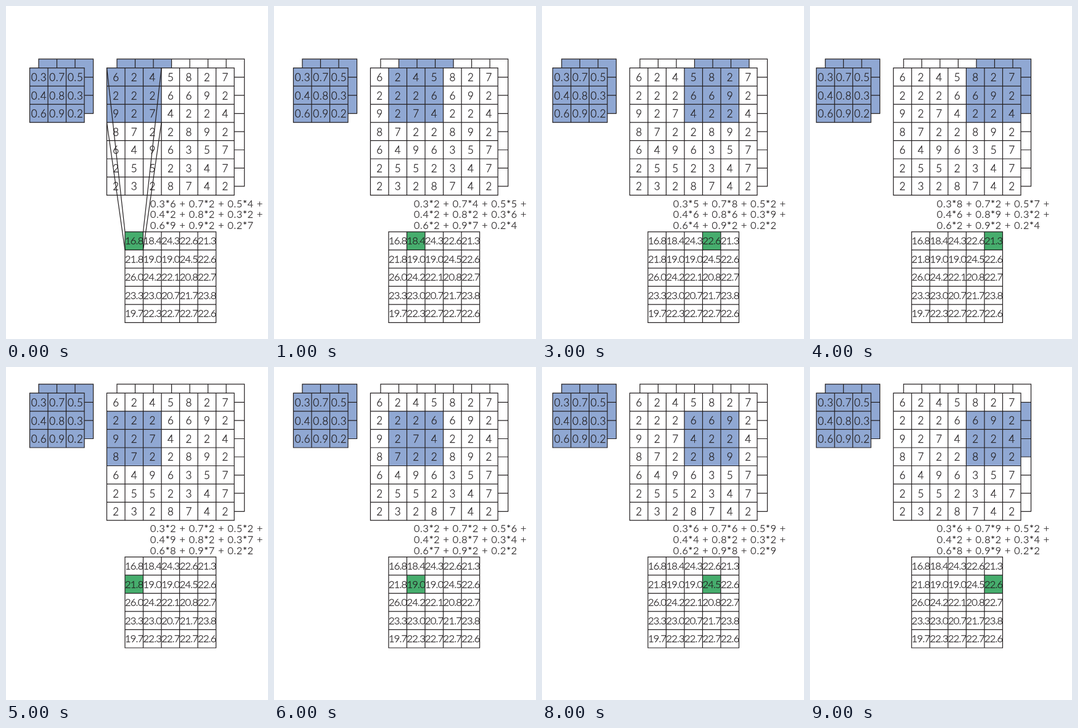
An HTML page that plays this animation: 425x541 px, repeating every 10 s.

```html
<!DOCTYPE html>
<html lang="en">
<head>
<meta charset="utf-8">
<title>Convolution</title>
<style>
  html, body { margin: 0; width: 100%; height: 100%; overflow: hidden; background: #fff; }
  svg { display: block; width: 100vw; height: 100vh; }
  text {
    font: 300 17px Lato, "Open Sans", sans-serif;
    fill: #231f20; stroke: #231f20; stroke-width: .3; white-space: pre;
  }
  .cell { text-anchor: middle; }
  .weight { letter-spacing: .6px; }
  .result { font-size: 16.5px; letter-spacing: -.8px; }
  .sum { font-size: 16px; letter-spacing: .8px; }
  path { fill: none; stroke: #231f20; stroke-width: 1.2; }
</style>
</head>
<body>
<svg id="stage" viewBox="0 0 425 541"></svg>
<script>
const CELL = 29.53, BLUE = '#90a8d3', GREEN = '#46ad6d';
const BACK_Y = 86.1, FRONT_Y = 100.6, OUT_X = 193, OUT_Y = 366.8;
const KERNEL_X = 38.5, INPUT_X = 163.5;
const STEP_MS = 1000, STEPS = 10, COLS = 5;
const kernel = ['0.3 0.7 0.5', '0.4 0.8 0.3', '0.6 0.9 0.2'].map(r => r.split(' '));
const input = ['6245827', '2226692', '9274224', '8722892', '6496357', '2552347', '2328742']
  .map(r => [...r]);
const output = [
  '16.8 18.4 24.3 22.6 21.3',
  '21.8 19.0 19.0 24.5 22.6',
  '26.0 24.2 22.1 20.8 22.7',
  '23.3 23.0 20.7 21.7 23.8',
  '19.7 22.3 22.7 22.7 22.6'
].map(r => r.split(' '));

const square = (x, y, cells, fill) =>
  `<rect x="${x}" y="${y}" width="${cells * CELL}" height="${cells * CELL}" fill="${fill}"/>`;

// A white grid with one filled block of cells
function grid(x, y, n, block, fill, col = 0, row = 0) {
  const size = n * CELL;
  let lines = '';
  for (let i = 0; i <= n; i++) {
    const d = i * CELL;
    lines += `M${x + d} ${y - .6}v${size + 1.2}M${x - .6} ${y + d}h${size + 1.2}`;
  }
  return square(x, y, n, '#fff') +
    square(x + col * CELL, y + row * CELL, block, fill) + `<path d="${lines}"/>`;
}

function labels(x, y, values, rise, style = '') {
  return values.map((line, r) => line.map((value, c) =>
    `<text class="cell ${style}" x="${x + (c + .5) * CELL}" y="${y + (r + .5) * CELL + rise}">${value}</text>`
  ).join('')).join('');
}

function formula(col, row) {
  return kernel.map((line, r) => {
    const terms = line.map((k, c) => `${k}*${input[row + r][col + c]}`).join(' + ');
    return `<text class="sum" x="234" y="${326.7 + r * 17.6}">${terms}${r < 2 ? ' +' : ''}</text>`;
  }).join('');
}

// Lines joining the corners of the window to the first result
function rays() {
  let lines = '';
  for (const i of [0, 1]) for (const j of [0, 1]) {
    lines += `M${INPUT_X + 3 * CELL * i} ${FRONT_Y + 3 * CELL * j}` +
      `L${OUT_X + CELL * i} ${OUT_Y + CELL * j}`;
  }
  return `<path d="${lines}"/>`;
}

function scene(step) {
  const col = step % COLS, row = Math.floor(step / COLS);
  return `<g transform="translate(${-7.05 * col} ${-58.2 * row})">` +
    grid(53, BACK_Y, 3, 3, BLUE) +
    grid(KERNEL_X, FRONT_Y, 3, 3, BLUE) + labels(KERNEL_X + .3, FRONT_Y, kernel, 7, 'weight') +
    grid(180, BACK_Y, 7, 3, BLUE, col, row) +
    grid(INPUT_X, FRONT_Y, 7, 3, BLUE, col, row) + labels(INPUT_X, FRONT_Y, input, 6.7) +
    grid(OUT_X, OUT_Y, 5, 1, GREEN, col, row) + labels(OUT_X, OUT_Y, output, 5.8, 'result') +
    formula(col, row) + (step === 0 ? rays() : '') + '</g>';
}

const stage = document.getElementById('stage');
const start = performance.now();
let shown = -1;
function play() {
  const step = Math.floor((performance.now() - start) / STEP_MS) % STEPS;
  if (step !== shown) stage.innerHTML = scene(shown = step);
  requestAnimationFrame(play);
}
play();
</script>
</body>
</html>
```
